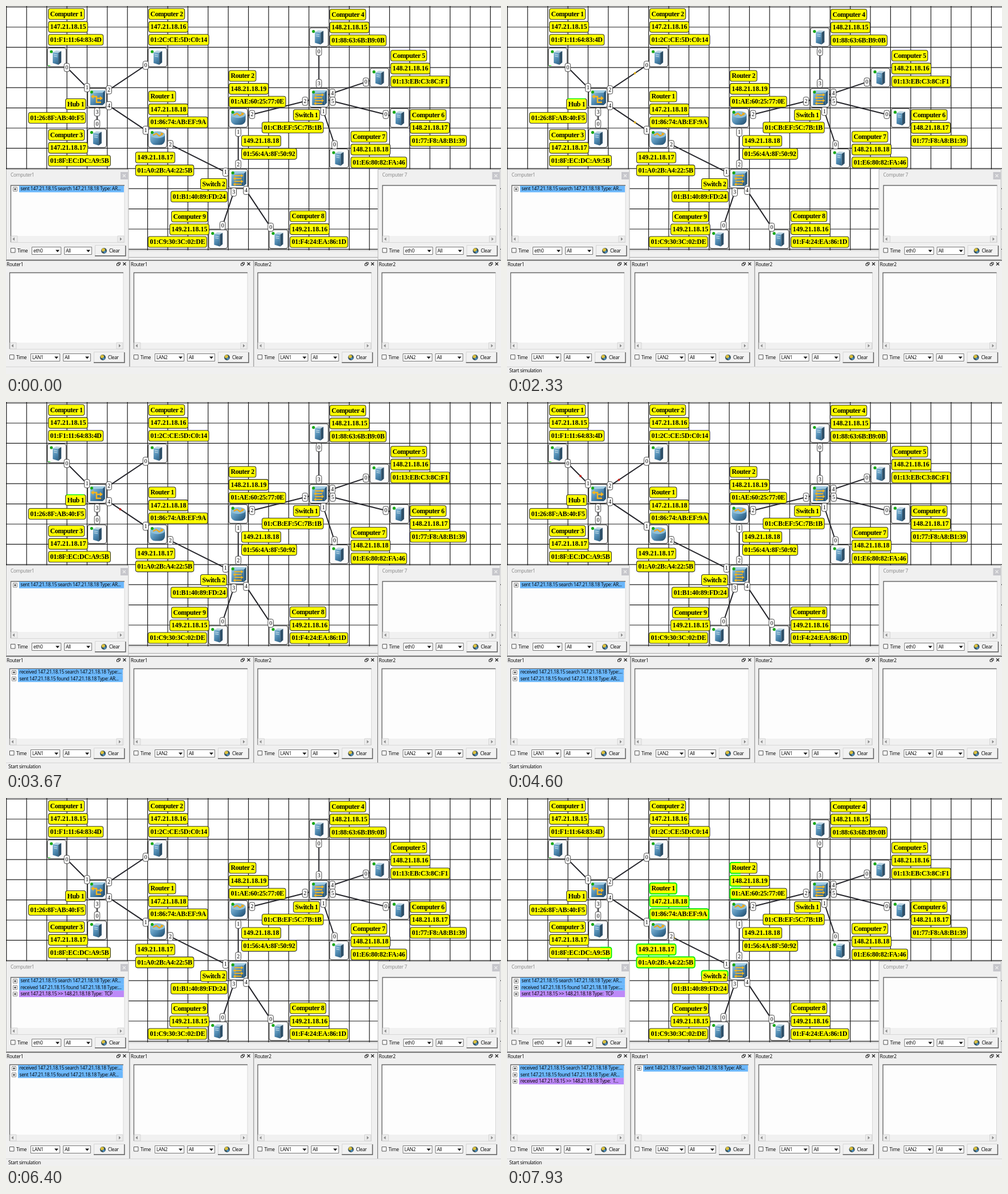
An HTML page with a canvas for the animation above (8 s loop, 869 by 645 pixels).

```html
<!DOCTYPE html>
<html lang="en">
<head>
<meta charset="utf-8">
<title>Network simulation</title>
<style>
html, body { margin: 0; width: 100%; height: 100%; overflow: hidden; background: #f0f0f0; }
canvas { display: block; }
</style>
</head>
<body>
<canvas id="stage" width="869" height="645"></canvas>
<script>
const ctx = document.getElementById('stage').getContext('2d');
const LOOP = 8000, STEP = 200 / 3, SPEED = 0.107, CELL = 35.4;
const UI = '8.4px "Open Sans", sans-serif', SERIF = '"Liberation Serif", serif';
const BLUE = '#6bb7fb', PURPLE = '#bd8af8', RED = '#c3231f', AMBER = '#e3b21c';
const GREEN = '#10f010';

// Devices by kind and grid cell
const node = (kind, col, row) => ({ kind, x: (col + .5) * CELL + .6, y: (row + .5) * CELL + 1.5 });
const pc1 = node('pc', 2, 2), pc2 = node('pc', 7, 2), pc3 = node('pc', 4, 6),
  pc4 = node('pc', 15, 1), pc5 = node('pc', 18, 3), pc6 = node('pc', 19, 5),
  pc7 = node('pc', 16, 7), pc8 = node('pc', 13, 11), pc9 = node('pc', 10, 11),
  hub = node('hub', 4, 4), router1 = node('router', 7, 6), router2 = node('router', 11, 5),
  switch1 = node('switch', 15, 4), switch2 = node('switch', 11, 8);
const nodes = [pc1, pc2, pc3, pc4, pc5, pc6, pc7, pc8, pc9, hub, router1, router2, switch1, switch2];

// Ends of each cable with their port numbers
const links = [
  [pc1, 0, hub, 1], [hub, 2, pc2, 0], [hub, 3, pc3, 0], [hub, 4, router1, 1],
  [router1, 2, switch2, 1], [switch2, 2, router2, 1], [router2, 2, switch1, 2],
  [switch1, 3, pc4, 0], [switch1, 4, pc5, 0], [switch1, 5, pc6, 0], [switch1, 1, pc7, 0],
  [switch2, 3, pc9, 0], [switch2, 4, pc8, 0]
];

// Stacks of captions: left edge, centre of the first line, lines
const captions = [
  [74, 14, 'Computer 1', '147.21.18.15', '01:F1:11:64:83:4D'],
  [250, 14, 'Computer 2', '147.21.18.16', '01:2C:CE:5D:C0:14'],
  [74, 226, 'Computer 3', '147.21.18.17', '01:8F:EC:DC:A9:5B'],
  [568, 15, 'Computer 4', '148.21.18.15', '01:88:63:6B:B9:0B'],
  [675, 87, 'Computer 5', '148.21.18.16', '01:13:EB:C3:8C:F1'],
  [709, 191, 'Computer 6', '148.21.18.17', '01:77:F8:A8:B1:39'],
  [605, 229, 'Computer 7', '148.21.18.18', '01:E6:80:82:FA:46'],
  [498, 368.5, 'Computer 8', '149.21.18.16', '01:F4:24:EA:86:1D'],
  [290, 369, 'Computer 9'], [287, 391.5, '149.21.18.15'], [249, 413.5, '01:C9:30:3C:02:DE'],
  [250, 158.5, 'Router 1', '147.21.18.18', '01:86:74:AB:EF:9A'],
  [227, 265.5, '149.21.18.17', '01:A0:2B:A4:22:5B'],
  [391, 122.5, 'Router 2', '148.21.18.19', '01:AE:60:25:77:0E'],
  [413, 236.5, '149.21.18.18', '01:56:4A:8F:50:92'],
  [104, 172, 'Hub 1'], [39, 196, '01:26:8F:AB:40:F5'],
  [504, 191, 'Switch 1'], [449, 213, '01:CB:EF:5C:7B:1B'],
  [341, 312, 'Switch 2'], [289, 334, '01:B1:40:89:FD:24']
];

const packets = [
  [pc1, hub, 600, AMBER],
  [hub, pc2, 1540, AMBER], [hub, pc3, 1540, AMBER], [hub, router1, 1540, AMBER],
  [router1, hub, 2930, RED],
  [hub, pc1, 4190, RED], [hub, pc2, 4190, RED], [hub, pc3, 4190, RED],
  [pc1, hub, 5333, RED],
  [hub, pc2, 6460, RED], [hub, pc3, 6340, RED], [hub, router1, 6340, RED],
  [router1, switch2, 7585, AMBER]
];

// Log rows: time of arrival, colour, text
const pc1Log = [
  [0, BLUE, 'sent 147.21.18.15 search 147.21.18.18 Type: AR...'],
  [5130, BLUE, 'received 147.21.18.15 found 147.21.18.18 Type:...'],
  [5260, PURPLE, 'sent 147.21.18.15 >> 148.21.18.18 Type:  TCP']
];
const router1Lan1 = [
  [2736, BLUE, 'received 147.21.18.15 search 147.21.18.18 Type:...'],
  [2800, BLUE, 'sent 147.21.18.15 found 147.21.18.18 Type: AR...'],
  [7536, PURPLE, 'received 147.21.18.15 >> 148.21.18.18 Type:  T...']
];
const router1Lan2 = [[7585, BLUE, 'sent 149.21.18.17 search 149.21.18.18 Type: AR...']];

function rect(x, y, w, h, fill, stroke, radius = 0, lineWidth = 1) {
  ctx.beginPath();
  ctx.roundRect(x, y, w, h, radius);
  if (fill) { ctx.fillStyle = fill; ctx.fill(); }
  if (stroke) { ctx.strokeStyle = stroke; ctx.lineWidth = lineWidth; ctx.stroke(); }
}
function line(color, width, ...points) {
  ctx.beginPath();
  for (let i = 0; i < points.length; i += 2) ctx.lineTo(points[i], points[i + 1]);
  ctx.strokeStyle = color;
  ctx.lineWidth = width;
  ctx.stroke();
}
function shape(fill, ...points) {
  ctx.beginPath();
  for (let i = 0; i < points.length; i += 2) ctx.lineTo(points[i], points[i + 1]);
  ctx.fillStyle = fill;
  ctx.fill();
}
function disc(x, y, r, fill, ry = r) {
  ctx.beginPath();
  ctx.ellipse(x, y, r, ry, 0, 0, 7);
  ctx.fillStyle = fill;
  ctx.fill();
}
function text(str, x, y, font, color = '#000', align = 'left', spacing = 0) {
  ctx.font = font;
  ctx.letterSpacing = spacing + 'px';
  ctx.textAlign = align;
  ctx.textBaseline = 'middle';
  ctx.fillStyle = color;
  ctx.fillText(str, x, y);
}
const uiText = (str, x, y, color) => text(str, x, y + .5, UI, color, 'left', -.3);
function along(a, b, distance) {
  const k = distance / Math.hypot(b.x - a.x, b.y - a.y);
  return [a.x + (b.x - a.x) * k, a.y + (b.y - a.y) * k, k];
}

function drawGrid() {
  rect(0, 0, 869, 428, '#fff');
  for (let i = 0; i < 25; i++) {
    const p = i * CELL + .8;
    line('#1c1c1c', 1.2, p, 0, p, 428);
    if (i < 13) line('#1c1c1c', 1.2, 0, p + .8, 869, p + .8);
  }
  rect(0, 428, 869, 217, '#f0f0f0');
  line('#bbb', 1, 215, 428.5, 654, 428.5);
  line('#aaa', 1, 215, 440.5, 654, 440.5);
}

function drawNode({ kind, x, y }) {
  ctx.save();
  ctx.translate(x, y);
  rect(-16.5, -16.5, 33, 33, '#fcfcfc', '#444', 4, 1.2);
  const metal = ctx.createLinearGradient(-10, -10, 10, 12);
  metal.addColorStop(0, '#8fc3e0');
  metal.addColorStop(.55, '#4b86ae');
  metal.addColorStop(1, '#25506f');
  if (kind === 'pc') {
    shape('#b9d3e2', -7, -9, -1, -12, 8, -11, 3, -8);
    shape(metal, -7, -9, 3, -8, 3, 13, -7, 10);
    shape('#2d4f68', 3, -8, 8, -11, 8, 9, 3, 13);
    line('#d3e6f0', 1, -5, -5, 1, -4);
    line('#d3e6f0', 1, -5, -2, 1, -1);
  } else if (kind === 'router') {
    rect(-13, -6, 26, 18, metal, null, [0, 0, 9, 9]);
    disc(0, -6, 13, '#8fbfd8', 6);
    line('#f0a818', 2.2, -8, -5, -2, -8, 3, -4, 8, -7);
    shape('#f0a818', 5, -10, 11, -8, 7, -4);
  } else {
    shape('#9fcbe2', -12, -9, -8, -13, 14, -13, 10, -9);
    shape(metal, -12, -9, 10, -9, 10, 13, -12, 13);
    shape('#2b5878', 10, -9, 14, -13, 14, 9, 10, 13);
    if (kind === 'hub') {
      line('#f5b520', 2.5, -8, -2, -1, -2, -1, 8, 7, 8);
      line('#f5b520', 2.5, -1, 1, 7, 1);
      shape('#f5b520', -11, -2, -6, -6, -6, 2);
      shape('#f5b520', 10, 1, 5, -3, 5, 5);
    } else {
      for (const row of [-5, 0, 5, 10]) {
        const side = row % 2 ? 1 : -1;
        line('#f5b520', 2, -7, row, 6, row);
        shape('#f5b520', side * 9, row, side * 5, row - 3, side * 5, row + 3);
      }
    }
  }
  disc(-9.5, -10, 2.6, '#18a818');
  ctx.restore();
}

function drawPort(a, b, number) {
  const [x, y] = along(a, b, 25);
  rect(x - 4.75, y - 7.25, 9.5, 14.5, '#fff', '#444', 3);
  text(number, x, y + .5, '10px ' + SERIF, '#000', 'center');
}

function drawCaptions(border, width) {
  for (const [x, top, ...lines] of captions) lines.forEach((str, i) => {
    const spacing = str.includes(':') ? -.3 : str.includes('.') ? 0 : -.45;
    const font = 'bold 12px ' + SERIF;
    ctx.font = font;
    ctx.letterSpacing = spacing + 'px';
    const y = top + i * 22.6;
    rect(x + .5, y - 9.5, ctx.measureText(str).width + 6, 19, '#ff0', border, 3.5, width);
    text(str, x + 3.5, y + .5, font, '#000', 'left', spacing);
  });
}

function drawCombo(x, y, w, value) {
  rect(x + .5, y - 6.5, w, 13, '#fff', '#777');
  uiText(value, x + 3, y);
  shape('#111', x + w - 9, y - 1.5, x + w - 2, y - 1.5, x + w - 5.5, y + 2.5);
}

// List box with scroll bar and log rows, then the controls below it
function drawLog(x, top, bottom, controls, source, rows, t) {
  rect(x + 8.5, top + .5, 199.5, bottom - top, '#fdfdfd', '#d8d8d8');
  line('#666', 1.3, x + 8.5, bottom, x + 8.5, top + .5, x + 208, top + .5);
  rect(x + 9.5, bottom - 11, 198, 11, '#f1f1f1');
  for (const [ax, d] of [[14, -1], [201, 1]]) {
    rect(x + ax - 5, bottom - 11, 11, 11, '#ececec', '#d4d4d4');
    shape('#888', x + ax + d * 2.5, bottom - 5.5, x + ax - d, bottom - 8.5, x + ax - d, bottom - 2.5);
  }
  rows.filter(row => t >= row[0]).forEach(([, color, str], i) => {
    const y = top + 7 + i * 11.3;
    rect(x + 23, y - 6, 184, 11.4, color);
    rect(x + 12.5, y - 3.5, 7, 7, '#fff', '#888');
    line('#111', 1, x + 14, y, x + 18, y);
    line('#111', 1, x + 16, y - 2, x + 16, y + 2);
    uiText(str, x + 25.5, y - .2);
  });
  rect(x + 8.5, controls - 4.5, 7.5, 7.5, '#fff', '#555');
  uiText('Time', x + 20, controls);
  drawCombo(x + 45, controls, 51, source);
  drawCombo(x + 102, controls, 48, 'All');
  rect(x + 156.5, controls - 9.5, 53, 18, '#f2f2f2', '#d6d6d6');
  line('#5c5c5c', 1.4, x + 156, controls + 9, x + 210, controls + 9, x + 210, controls - 9);
  disc(x + 172, controls, 5, '#34505c');
  disc(x + 171, controls - 1.5, 3, '#dcc03c');
  disc(x + 173.5, controls + 2, 2, '#4d8fc0');
  uiText('Clear', x + 181, controls);
}

function drawFloating(x, title, rows, t) {
  rect(x + .5, 286.5, 214.5, 158, '#f0f0f0', '#b4b4b4');
  uiText(title, x + 8, 296, '#858585');
  rect(x + 201, 291, 13, 13, '#c6c6cb');
  line('#eee', 1.2, x + 205, 295, x + 210, 300);
  line('#eee', 1.2, x + 210, 295, x + 205, 300);
  drawLog(x, 314, 414, 429, 'eth0', rows, t);
}

function drawDocked(x, title, source, rows, t) {
  rect(x, 445, 218, 187, '#f0f0f0');
  line('#666', 1.5, x, 445.7, x + 218, 445.7);
  line('#777', 1.2, x + 217, 445, x + 217, 632);
  uiText(title, x + 1, 453);
  rect(x + 196.5, 449.5, 4, 3.5, null, '#222');
  rect(x + 194.5, 451.5, 4, 3.5, '#f0f0f0', '#222');
  line('#222', 1.3, x + 205.5, 449.5, x + 210.5, 454.5);
  line('#222', 1.3, x + 210.5, 449.5, x + 205.5, 454.5);
  drawLog(x - 2, 467, 601, 616, source, rows, t);
}

function draw(t) {
  drawGrid();
  for (const [a, , b] of links) line('#25252b', 2, a.x, a.y, b.x, b.y);
  for (const [a, b, start, color] of packets) {
    const [x, y, progress] = along(a, b, (t - start) * SPEED);
    if (progress > 0 && progress < 1) disc(x, y, 2, color);
  }
  nodes.forEach(drawNode);
  line(GREEN, 1, 74, 104.5, 78, 104.5);
  for (const [a, portA, b, portB] of links) {
    drawPort(a, b, portA);
    drawPort(b, a, portB);
  }
  drawCaptions('#333', 1.1);
  if (t >= 1330 && t < 4200) line(GREEN, 1.5, 106, 162.5, 137, 162.5);

  // Only the repainted area around the active router turns green
  if (t >= 7536) {
    ctx.save();
    ctx.beginPath();
    ctx.rect(164, 104, 246, 208);
    ctx.clip();
    drawCaptions(GREEN, 2);
    ctx.restore();
  }

  drawFloating(0, 'Computer1', pc1Log, t);
  drawFloating(652.5, 'Computer 7', [], t);
  drawDocked(0, 'Router1', 'LAN1', router1Lan1, t);
  drawDocked(218, 'Router1', 'LAN2', router1Lan2, t);
  drawDocked(435.5, 'Router2', 'LAN1', [], t);
  drawDocked(653.5, 'Router2', 'LAN2', [], t);
  line('#d5d5d5', 1, 0, 632.5, 869, 632.5);
  if (t >= 66) uiText('Start simulation', 4, 639);
}

const origin = performance.now();
function tick() {
  const t = (performance.now() - origin) % LOOP;
  draw(Math.floor(t / STEP) * STEP);
  requestAnimationFrame(tick);
}
tick();
</script>
</body>
</html>
```
